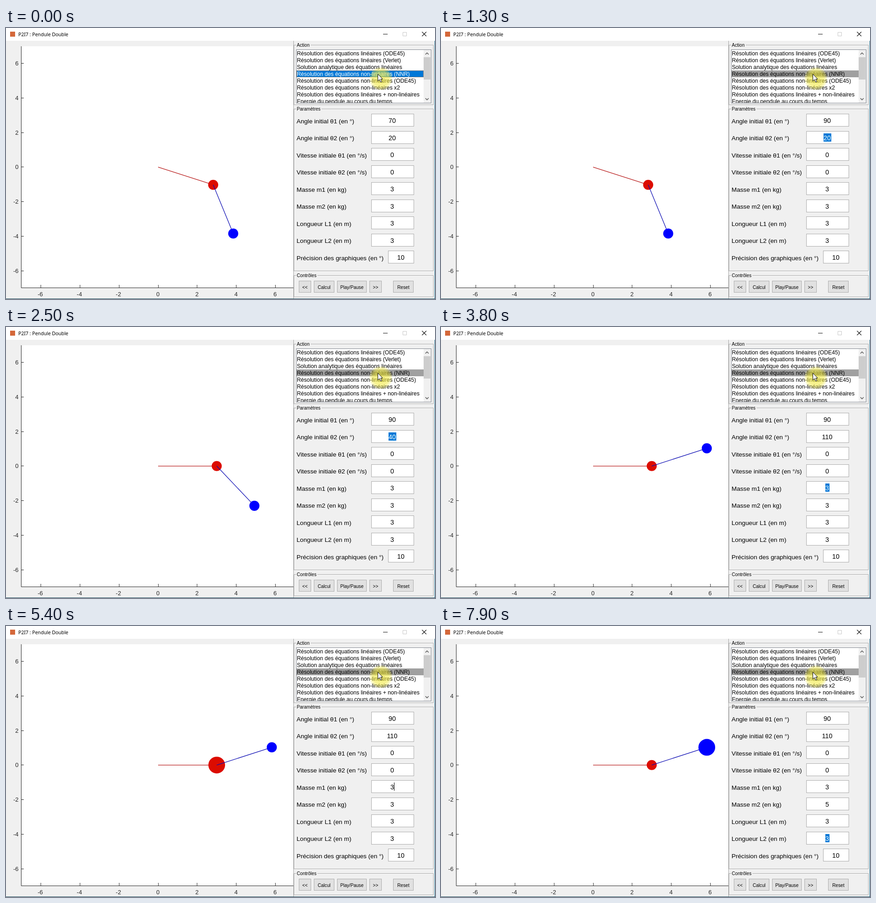
Write an HTML page that moves like this. It is 942x594 px and loops after 8000 ms.

```html
<!DOCTYPE html>
<html lang="fr">
<head>
<meta charset="utf-8">
<title>Pendule Double</title>
<style>
  html, body { margin: 0; width: 100%; height: 100%; overflow: hidden; background: #f0f0f0; }
  svg { display: block; width: 942px; height: 594px; font-family: Arial, "Liberation Sans", sans-serif; }
  text { white-space: pre; }
  .mid { text-anchor: middle; }
  .end { text-anchor: end; }
  .title { font: 10.6px "Segoe UI", "Open Sans", sans-serif; }
  .tick { font-size: 13px; fill: #262626; }
  .row { font-size: 12.2px; }
  .label { font-size: 13.7px; }
  .value { font-size: 14.3px; }
  .small { font-size: 10.1px; }
</style>
</head>
<body>
<svg id="stage" viewBox="0 0 942 594">
  <radialGradient id="glow">
    <stop offset="0" stop-color="#f2ea3c" stop-opacity=".68"/>
    <stop offset=".7" stop-color="#f2ea3c" stop-opacity=".55"/>
    <stop offset="1" stop-color="#f2ea3c" stop-opacity=".15"/>
  </radialGradient>
</svg>
<script>
const svg = document.getElementById('stage');
const LOOP = 8000;
const BLUE = '#0078d7';

function add(tag, attrs, text, parent = svg) {
  const el = document.createElementNS('http://www.w3.org/2000/svg', tag);
  set(el, attrs);
  if (text !== undefined) el.textContent = text;
  parent.appendChild(el);
  return el;
}
function set(el, attrs) {
  for (const key in attrs) el.setAttribute(key, attrs[key]);
}
const rect = (x, y, width, height, fill, stroke = 'none', parent) =>
  add('rect', { x, y, width, height, fill, stroke }, undefined, parent);
const path = (d, stroke, width = 1, fill = 'none') =>
  add('path', { d, stroke, 'stroke-width': width, fill });
const label = (x, y, text, cls, parent) => add('text', { x, y, class: cls }, text, parent);

// Plot coordinates
const px = x => 334 + 42.9 * x;
const py = y => 304.8 - 37.9 * y;

function drawTitleBar() {
  rect(0, 0, 942, 28, '#fff');
  rect(9, 8, 11, 11, '#d4683a');
  label(27, 18, 'P2I7 : Pendule Double', 'title');
  path('M828 13.5H838', '#111');
  path('M871.5 9.5H879.5V17.5H871.5Z', '#c8c8c8');
  path('M913.5 8.5L923 18M923 8.5L913.5 18', '#111', 1.1);
}

function drawAxes() {
  rect(33, 40, 598, 529, '#fff');
  let d = 'M33.5 40V569.5H631';
  for (let v = -6; v <= 6; v += 2) {
    d += `M33 ${Math.floor(py(v)) + .5}h6M${Math.floor(px(v)) + .5} 569v-6`;
    label(27.5, py(v) + 4.6, v, 'tick end');
    label(px(v) - (v < 0 ? 1.3 : .5), 588, v, 'tick mid');
  }
  path(d, '#262626');
}

function panel(top, bottom, title, titleWidth) {
  const box = (o, color) =>
    path(`M632.5 ${top + .5}H938.5V${bottom + .5}H632.5Z`, color)
      .setAttribute('transform', `translate(${o} ${o})`);
  box(1, '#fff');
  box(0, '#a5a5a5');
  rect(637, top - 4, titleWidth + 4, 9, '#f0f0f0');
  label(638.5, top + 4, title, 'small');
}

function drawList() {
  const rows = [
    'Résolution des équations linéaires (ODE45)',
    'Résolution des équations linéaires (Verlet)',
    'Solution analytique des équations linéaires',
    'Résolution des équations non-linéaires (NNR)',
    'Résolution des équations non-linéaires (ODE45)',
    'Résolution des équations non-linéaires x2',
    'Résolution des équations linéaires + non-linéaires',
    'Energie du pendule au cours du temps'
  ];
  rect(637.5, 47.5, 296, 117, '#fff', '#828790');
  const clip = add('clipPath', { id: 'list' });
  rect(638, 48, 279, 116, '#fff', 'none', clip);
  const group = add('g', { 'clip-path': 'url(#list)' });
  const bar = rect(638, 93, 279, 15, BLUE, 'none', group);
  const outline = rect(638.5, 93.5, 278, 14, 'none', '#ff8728', group);
  set(outline, { 'stroke-dasharray': '1 1' });
  const texts = rows.map((row, i) => label(638.7, 60.3 + 15 * i, row, 'row', group));

  rect(917, 48, 16, 116, '#f0f0f0');
  rect(917, 64, 15, 49, '#cdcdcd');
  path('M921 58l3.5-3.5l3.5 3.5M921 154l3.5 3.5l3.5-3.5', '#505050', 1.4);
  return { bar, outline, text: texts[3] };
}

function drawField(name, i) {
  const wide = i < 8;
  const y = 188.5 + 37.56 * i;
  const top = Math.floor(y) + .5;
  const x = wide ? 802.5 : 839.5;
  const cx = wide ? 848 : 867;
  label(638, y + 20, name, 'label');
  rect(x, top, 895.5 - x, 27, '#fff', '#ababab');
  return {
    cx,
    mark: rect(0, top + 4.5, 0, 18, BLUE),
    caret: rect(0, top + 4.5, 1, 18, '#000'),
    text: label(cx, top + 19, '', 'value mid')
  };
}

function drawButton([x, width, text]) {
  rect(x + .5, 554.5, width, 25, '#e1e1e1', '#adadad');
  label(x + .5 + width / 2, 571.5, text, 'small mid');
}

function drawPointer() {
  add('circle', { cx: 823, cy: 111, r: 25, fill: 'url(#glow)' });
  path('M816.5 101V116.2L820 113L822.6 118.8L825.2 117.6L822.7 112H827.3Z', '#000', 1, '#fff');
}

drawTitleBar();
drawAxes();

const rod1 = path('', '#b81c1c', 1.3);
const bob1 = add('circle', { fill: '#dc0c00' });
const rod2 = path('', '#1010b4', 1.3);
const bob2 = add('circle', { fill: '#0000ff' });

rect(631, 28, 311, 566, '#f0f0f0');
path('M631.5 28V593', '#a5a5a5');
panel(37, 168, 'Action', 28);
panel(177, 532, 'Paramètres', 52);
panel(542, 589, 'Contrôles', 43);
const list = drawList();
const fields = [
  'Angle initial θ1 (en °)', 'Angle initial θ2 (en °)',
  'Vitesse initiale θ1 (en °/s)', 'Vitesse initiale θ2 (en °/s)',
  'Masse m1 (en kg)', 'Masse m2 (en kg)',
  'Longueur L1 (en m)', 'Longueur L2 (en m)',
  'Précision des graphiques (en °)'
].map(drawField);
[[643, 26, '<<'], [676, 44, 'Calcul'], [727, 64, 'Play/Pause'],
 [798, 26, '>>'], [850, 44, 'Reset']].forEach(drawButton);
rect(941, 28, 1, 566, '#2b7a99');
rect(0, 593, 942, 1, '#1d4a5c');
drawPointer();

// Keyboard: [time, focused field, typed text]; no text means tabbed in and selected
const KEYS = [
  [300, 0], [600, 0, '9'], [800, 0, '90'],
  [1100, 1], [1700, 1, '4'], [1900, 1, '40'], [2300, 1],
  [2800, 1, '1'], [2900, 1, '11'], [3000, 1, '110'],
  [3300, 2], [3500, 3], [3700, 4],
  [4200, 4, '5'], [4500, 4], [5200, 4, '3'],
  [5600, 5], [6200, 5, '5'], [6600, 6], [7400, 7]
];
// Plot redraws: [time, angle 1, angle 2, mass 1, mass 2]
const POSES = [
  [0, 70, 20, 3, 3], [1500, 90, 20, 3, 3], [2300, 90, 40, 3, 3],
  [3500, 90, 110, 3, 3], [4800, 90, 110, 5, 3],
  [5900, 90, 110, 3, 3], [7200, 90, 110, 3, 5]
];

function drawFields(t) {
  const values = ['70', '20', '0', '0', '3', '3', '3', '3', '10'];
  let focus = -1, selected = false;
  for (const [at, field, typed] of KEYS) {
    if (at > t) break;
    focus = field;
    selected = typed === undefined;
    if (!selected) values[field] = typed;
  }
  fields.forEach((f, i) => {
    const width = values[i].length * 7.95;
    const marked = i === focus && selected;
    f.text.textContent = values[i];
    set(f.text, { fill: marked ? '#fff' : '#000' });
    set(f.mark, { x: Math.round(f.cx - width / 2), width: marked ? Math.round(width + 1) : 0 });
    set(f.caret, { x: Math.round(f.cx + width / 2), width: i === focus && !selected ? 1 : 0 });
  });
  const listActive = focus < 0;
  set(list.bar, { fill: listActive ? BLUE : '#a0a0a0' });
  set(list.text, { fill: listActive ? '#fff' : '#000' });
  set(list.outline, { opacity: listActive ? 1 : 0 });
}

function drawPendulum(t) {
  const [, a1, a2, m1, m2] = POSES.filter(p => p[0] <= t).pop();
  const rad = Math.PI / 180, length = 3, size = 3.68;
  const x1 = length * Math.sin(a1 * rad), y1 = -length * Math.cos(a1 * rad);
  const x2 = x1 + length * Math.sin(a2 * rad), y2 = y1 - length * Math.cos(a2 * rad);
  set(rod1, { d: `M${px(0)} ${py(0)}L${px(x1)} ${py(y1)}` });
  set(rod2, { d: `M${px(x1)} ${py(y1)}L${px(x2)} ${py(y2)}` });
  set(bob1, { cx: px(x1), cy: py(y1), r: m1 * size });
  set(bob2, { cx: px(x2), cy: py(y2), r: m2 * size });
}

const start = performance.now();
function frame(now) {
  const t = Math.max(0, now - start) % LOOP;
  drawFields(t);
  drawPendulum(t);
  requestAnimationFrame(frame);
}
frame(start);
</script>
</body>
</html>
```
